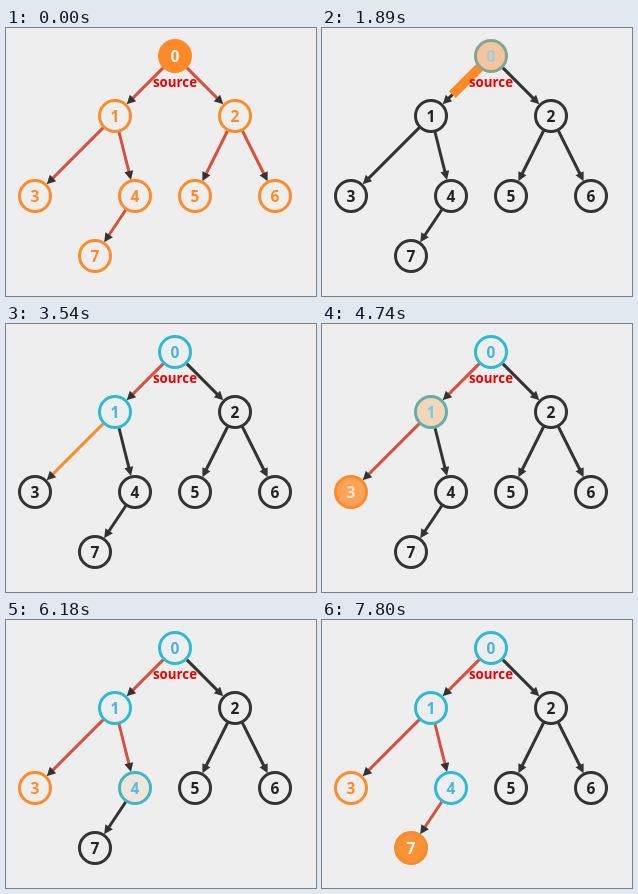
An HTML page with a canvas that plays this animation: 310x268 px, repeating every 8000 ms.

```html
<!DOCTYPE html>
<html lang="en">
<head>
<meta charset="utf-8">
<title>Depth-first traversal</title>
<style>
  html, body { margin: 0; width: 100%; height: 100%; overflow: hidden; background: #eee; }
  canvas { display: block; width: 310px; height: 268px; }
</style>
</head>
<body>
<canvas id="stage"></canvas>
<script>
const WIDTH = 310, HEIGHT = 268, LOOP = 8000, STEP = 30, LAST_CHANGE = 7800;
const RESET = 1170, RADIUS = 17;
const BG = [238, 238, 238], DARK = [51, 51, 51], WHITE = [255, 255, 255];
const ORANGE = [255, 138, 39], CYAN = [46, 187, 209], RED = [217, 81, 60];

const STYLES = {
  plain: { fill: BG, stroke: DARK, text: [34, 34, 38] },
  seen: { fill: BG, stroke: CYAN, text: [73, 182, 217] },
  full: { fill: ORANGE, stroke: ORANGE, text: WHITE },
  done: { fill: BG, stroke: ORANGE, text: ORANGE }
};

// Each change is [start, style, duration]; the default duration is 250 ms.
const node = (x, y, changes = [], first = 'done') => ({
  x, y, first,
  changes: first === 'done' ? [[RESET, 'plain', 0], ...changes] : changes
});

const nodes = [
  node(169, 28, [[1665, 'seen', 420]], 'full'),
  node(109, 88, [[2240, 'seen'], [2720, 'full'], [3135, 'seen', 420], [4641, 'full'], [5630, 'seen']]),
  node(229, 88),
  node(29, 168, [[3710, 'seen'], [4165, 'full'], [4641, 'done']]),
  node(129, 168, [[5630, 'seen'], [6110, 'full'], [6525, 'seen', 420]]),
  node(189, 168),
  node(269, 168),
  node(89, 228, [[7070, 'seen'], [7465, 'full', 450]])
];

// grow: highlight starts, thin: highlight settles, tree: becomes a tree edge
const edges = [
  { from: 0, to: 1, grow: 1650, thin: 2070, tree: 2070 },
  { from: 0, to: 2 },
  { from: 1, to: 3, grow: 3120, thin: 3540, tree: 4680 },
  { from: 1, to: 4, grow: 5050, thin: 5490, tree: 5670 },
  { from: 2, to: 5 },
  { from: 2, to: 6 },
  { from: 4, to: 7, grow: 6510, thin: 6930, tree: 6930 }
];

const canvas = document.getElementById('stage');
const ctx = canvas.getContext('2d');
const ratio = window.devicePixelRatio || 1;
canvas.width = Math.round(WIDTH * ratio);
canvas.height = Math.round(HEIGHT * ratio);
ctx.scale(ratio, ratio);

const rgb = c => `rgb(${c.map(Math.round).join(',')})`;
const mix = (a, b, p) => a.map((v, i) => v + (b[i] - v) * p);
const ease = t => t < 0.5 ? 4 * t ** 3 : 1 - 4 * (1 - t) ** 3;
const progress = (time, start, duration) =>
  duration ? ease(Math.min(1, Math.max(0, (time - start) / duration))) : 1;

function nodeStyle({ first, changes }, time) {
  let style = STYLES[first];
  for (const [start, name, duration = 250] of changes) {
    if (time < start) break;
    const p = progress(time, start, duration), next = STYLES[name];
    style = {
      fill: mix(style.fill, next.fill, p),
      stroke: mix(style.stroke, next.stroke, p),
      text: mix(style.text, next.text, p)
    };
  }
  return style;
}

function edgeColor({ thin, tree }, time) {
  if (time < RESET || time >= tree) return RED;
  return time >= thin ? ORANGE : DARK;
}

function bar(from, to, width, color) {
  ctx.lineWidth = width;
  ctx.strokeStyle = rgb(color);
  ctx.beginPath();
  ctx.moveTo(from, 0);
  ctx.lineTo(to, 0);
  ctx.stroke();
}

function drawEdge(edge, time) {
  const a = nodes[edge.from], b = nodes[edge.to];
  const dx = b.x - a.x, dy = b.y - a.y;
  const start = RADIUS - 0.5, end = Math.hypot(dx, dy) - RADIUS;
  ctx.save();
  ctx.translate(a.x, a.y);
  ctx.rotate(Math.atan2(dy, dx));
  bar(start, end - 4, 3, edgeColor(edge, time));
  ctx.fillStyle = rgb(DARK);
  ctx.beginPath();
  ctx.moveTo(end + 0.5, 0);
  ctx.lineTo(end - 8.5, -4.5);
  ctx.lineTo(end - 8.5, 4.5);
  ctx.fill();
  if (time > edge.grow && time < edge.thin) {
    const p = progress(time, edge.grow, edge.thin - edge.grow - 20);
    bar(start, start + (end - start) * p, 9.5, ORANGE);
  }
  ctx.restore();
}

function drawNode(item, label, time) {
  const { fill, stroke, text } = nodeStyle(item, time);
  ctx.beginPath();
  ctx.arc(item.x, item.y, RADIUS - 1.5, 0, Math.PI * 2);
  ctx.fillStyle = rgb(fill);
  ctx.fill();
  ctx.lineWidth = 3;
  ctx.strokeStyle = rgb(stroke);
  ctx.stroke();
  ctx.font = 'bold 15.5px "Open Sans", "Noto Sans", sans-serif';
  ctx.fillStyle = rgb(text);
  ctx.fillText(label, item.x, item.y + 5.5);
}

function draw(time) {
  ctx.fillStyle = rgb(BG);
  ctx.fillRect(0, 0, WIDTH, HEIGHT);
  ctx.textAlign = 'center';
  edges.forEach(edge => drawEdge(edge, time));
  nodes.forEach((item, i) => drawNode(item, String(i), time));
  ctx.font = 'bold 13.3px "Open Sans", "Noto Sans", sans-serif';
  ctx.fillStyle = '#ee0000';
  ctx.fillText('source', 169, 59);
}

const origin = performance.now();
function tick() {
  const time = (performance.now() - origin) % LOOP;
  draw(Math.min(LAST_CHANGE, Math.floor(time / STEP) * STEP));
  requestAnimationFrame(tick);
}
tick();
</script>
</body>
</html>
```
